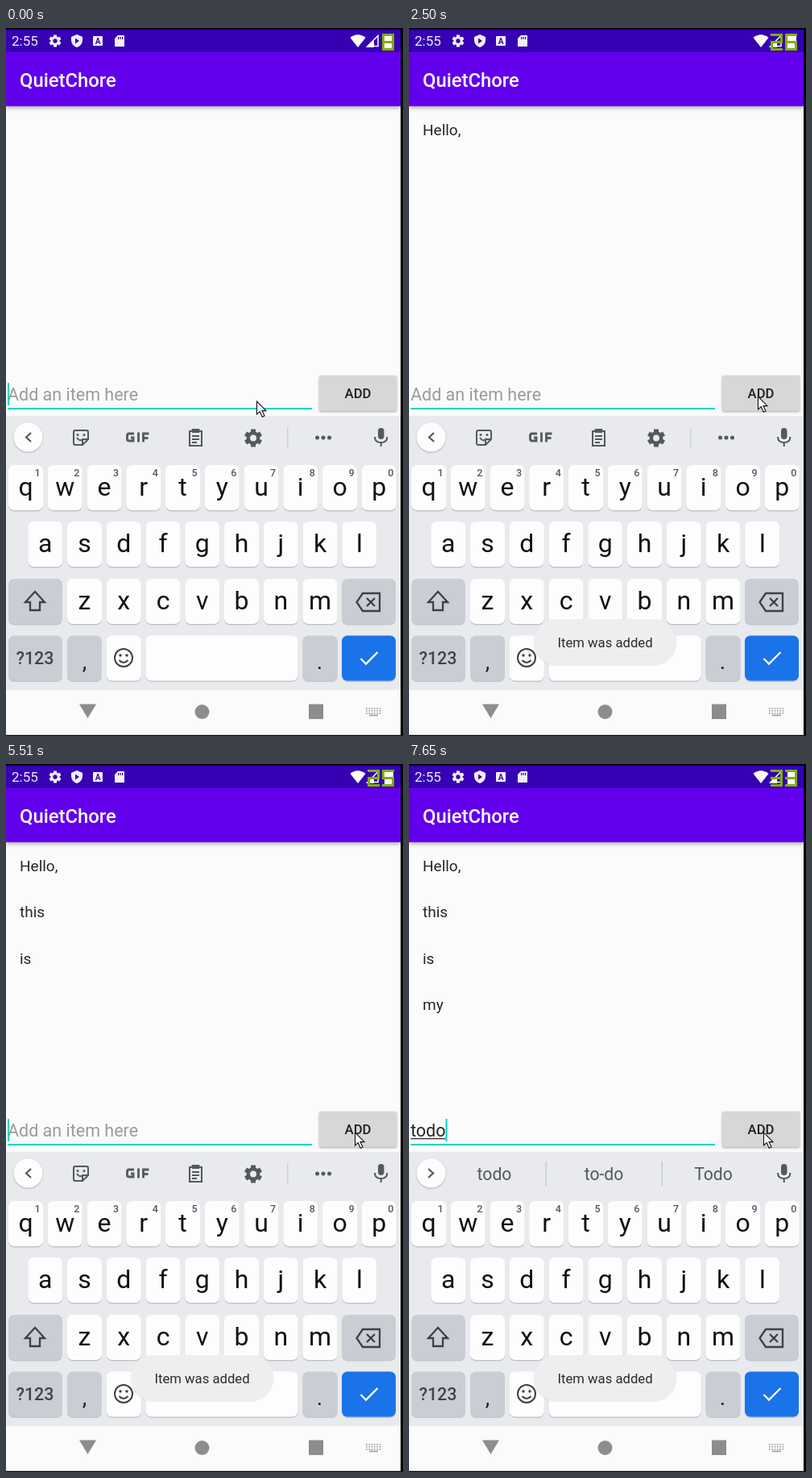
An HTML page with a canvas for the animation above (8000 ms loop, 493x878 px).

```html
<!DOCTYPE html>
<html lang="en">
<head>
<meta charset="utf-8">
<title>To-do list</title>
<style>
html, body { margin: 0; width: 100%; height: 100%; overflow: hidden; background: #000; }
canvas { display: block; width: 493px; height: 878px; }
</style>
</head>
<body>
<canvas id="stage" width="493" height="878"></canvas>
<script>
const ctx = document.getElementById('stage').getContext('2d');
const LOOP = 8000;
const TEAL = '#03d5c0', INK = '#55585d', PAPER = '#fbfbfb', BOARD = '#e8eaed', FUNC = '#cacdd4';

const START = {
  text: '', underline: 0, words: null, caret: true, items: [], fresh: 1,
  press: 0, toast: 0, mouse: [311.5, 463], fps: '8'
};

// Each step changes part of the state from its time on.
const STEPS = [
  [280, { text: 'H', underline: 1 }],
  [410, { text: 'He', underline: 2, words: ['He', 'Hey', 'Hello'] }],
  [540, { text: 'Hel', underline: 3, words: ['Hel', 'Hello', 'Help'], fps: '4' }],
  [670, { text: 'Hello', underline: 4, words: ['Hell', 'Hello', "He'll"] }],
  [940, { underline: 5, words: ['Hello', 'hello', "Hello's"] }],
  [1250, { text: 'Hello,', underline: 0, fps: '16' }],
  [1400, { words: ['I', 'how', 'the'] }],
  [1800, { mouse: [375, 460], fps: '26' }],
  [1950, { mouse: [433.5, 457] }],
  [2080, { press: 1 }],
  [2220, { press: 2, text: '', words: null, items: ['Hello,'], fresh: .5, toast: .5 }],
  [2360, { press: 0, fresh: 1, toast: 1 }],
  [2500, { caret: false }],
  [3050, { caret: true }],
  [3200, { text: 't', underline: 1 }],
  [3350, { text: 'th', underline: 2, words: ['th', 'the', 'that'], fps: '22' }],
  [3500, { text: 'thi', underline: 3, words: ['thi', 'this', 'think'] }],
  [3670, { text: 'this', underline: 4, words: ['this', "this'll", 'thistle'] }],
  [3820, { press: 1 }],
  [3970, { press: 2, text: '', words: null, items: ['Hello,', 'this'], fresh: .5, toast: .5 }],
  [4090, { press: 0, fresh: 1, toast: 0 }],
  [4390, { toast: .5, fps: '24' }],
  [4530, { toast: 1, text: 'i', underline: 1 }],
  [4670, { text: 'is', underline: 1, words: ['I', 'in', 'is'] }],
  [4810, { underline: 2, words: ['is', "isn't", 'island'] }],
  [5240, { press: 1, fps: '25' }],
  [5380, { press: 2, text: '', words: null, items: ['Hello,', 'this', 'is'], fresh: .5 }],
  [5510, { press: 0, fresh: 1 }],
  [5790, { text: 'm', underline: 1 }],
  [5930, { text: 'my', underline: 2, words: ['my', 'myself', 'mine'], toast: .5 }],
  [6060, { toast: 0 }],
  [6420, { mouse: [440.5, 457], toast: .5 }],
  [6560, { press: 1, toast: 1 }],
  [6690, { press: 2, text: '', words: null, items: ['Hello,', 'this', 'is', 'my'], fresh: .5, fps: '39' }],
  [6810, { press: 0, fresh: 1 }],
  [7350, { text: 't', underline: 1 }],
  [7500, { text: 'tod', underline: 3, words: ['tod', 'today', 'todo'] }],
  [7650, { text: 'todo', underline: 4, words: ['todo', 'to-do', 'Todo'], fps: '33' }]
];

const stateAt = t => STEPS.reduce((s, [at, change]) => at <= t ? Object.assign(s, change) : s, { ...START });

function rect(x, y, w, h, color) {
  ctx.fillStyle = color;
  ctx.fillRect(x, y, w, h);
}

function box(x, y, w, h, r, color) {
  ctx.fillStyle = color;
  ctx.beginPath();
  ctx.roundRect(x, y, w, h, r);
  ctx.fill();
}

function disc(x, y, r, color) {
  ctx.fillStyle = color;
  ctx.beginPath();
  ctx.arc(x, y, r, 0, 7);
  ctx.fill();
}

function fill(d, color) {
  ctx.fillStyle = color;
  ctx.fill(new Path2D(d));
}

function line(d, color, width = 2) {
  ctx.strokeStyle = color;
  ctx.lineWidth = width;
  ctx.stroke(new Path2D(d));
}

function label(text, x, y, size, color, align = 'left', weight = 400) {
  ctx.font = `${weight} ${size}px Roboto, sans-serif`;
  ctx.textAlign = align;
  ctx.fillStyle = color;
  ctx.fillText(text, x, y);
}

function shadowed(blur, dy, alpha, draw) {
  ctx.save();
  ctx.shadowColor = `rgba(0,0,0,${alpha})`;
  ctx.shadowBlur = blur;
  ctx.shadowOffsetY = dy;
  draw();
  ctx.restore();
}

function gear(x, y, r, color, hole) {
  ctx.save();
  ctx.translate(x, y);
  for (let i = 0; i < 3; i++) {
    rect(-r * .27, -r, r * .54, r * 2, color);
    ctx.rotate(Math.PI / 3);
  }
  disc(0, 0, r * .76, color);
  disc(0, 0, r * .36, hole);
  ctx.restore();
}

function header() {
  rect(0, 2, 490, 28, '#3700b3');
  shadowed(5, 2, .35, () => rect(0, 30, 490, 67, '#6200ee'));
  rect(0, 2, 490, 28, '#3700b3');
  label('2:55', 7, 22, 17, '#f0ebfa');
  gear(61, 16, 7.5, '#f3effb', '#3700b3');
  fill('M88 8 l7 3 v5 q-1 6 -7 8 q-6 -2 -7 -8 v-5z', '#f3effb');
  fill('M86 12.5 l5 3.5 l-5 3.5z', '#3700b3');
  box(108, 10, 12, 12, 1, '#f3effb');
  label('A', 114, 19.5, 10, '#3700b3', 'center', 700);
  fill('M139 9 h7 q1 0 1 1 v13 h-12 v-10z', '#f3effb');
  for (const x of [139, 141.5, 144]) rect(x, 11, 1.2, 3, '#3700b3');
  fill('M427.5 12 q9.5 -7.5 19 0 l-9.5 12z', '#fff');
  line('M449 22.5 h13 v-13z', '#fff', 1.5);
  fill('M447 24 L457 14 V24z', '#fff');
  fill('M470 10 h3 v-2 h5 v2 h3 v15 h-11z', '#fff');
  label('QuietChore', 17, 73, 23.8, '#fff', 'left', 500);
}

// Seven segments: top, upper right, lower right, bottom, lower left, upper left, middle.
const SEGMENTS = [[0, 0, 15, 3], [12, 0, 3, 11], [12, 9, 3, 12], [0, 18, 15, 3], [0, 9, 3, 12], [0, 0, 3, 11], [0, 9, 15, 3]];
const LIT = { 1: '12', 2: '01346', 3: '01236', 4: '1256', 5: '02356', 6: '023456', 8: '0123456', 9: '012356' };

function counter(digits) {
  [...digits].reverse().forEach((digit, place) => {
    for (const i of LIT[digit]) {
      const [x, y, w, h] = SEGMENTS[i];
      rect(467 - 18 * place + x, 7 + y, w, h, '#80b000');
    }
  });
}

function list({ items, fresh }) {
  items.forEach((item, i) => {
    ctx.globalAlpha = i === items.length - 1 ? fresh : 1;
    label(item, 17, 133 + 57.4 * i, 19, '#272727');
  });
  ctx.globalAlpha = 1;
}

function field({ text, underline, caret }) {
  label(text || 'Add an item here', 2, 462, 21.5, text ? '#272727' : '#9b9b9b');
  const width = text ? ctx.measureText(text).width : 0;
  if (text && underline) rect(2, 464, ctx.measureText(text.slice(0, underline)).width, 1.3, '#333');
  rect(2, 471, 378, 2, TEAL);
  if (caret) rect(2 + width, 440, 2, 28, TEAL);
}

function addButton({ press, mouse }) {
  const color = ['#d6d7d7', '#d0d1d1', '#babbbb'][press];
  shadowed(3, 1, .35, () => box(389, 431, 96, 44, 2, color));
  if (press === 1) {
    ctx.save();
    ctx.beginPath();
    ctx.rect(389, 431, 96, 44);
    ctx.clip();
    disc(mouse[0], 458, 33, '#c5c6c6');
    ctx.restore();
  }
  label('ADD', 437, 459, 16.7, '#202020', 'center', 500);
}

function toolbar() {
  line('M31 502 l-6 5.5 l6 5.5', INK, 2.2);
  line('M86 499 h14 q2 0 2 2 v9 l-7 7 h-9 q-2 0 -2 -2 v-14 q0 -2 2 -2z M102 510 h-5 q-2 0 -2 2 v5 M88 508 q4 6 8 1', INK, 2);
  disc(89, 504.5, 1.5, INK);
  disc(97, 504.5, 1.5, INK);
  line('M159 503 h-6 q-2.5 0 -2.5 2.5 v4 q0 2.5 2.5 2.5 h5 v-4 h-3 M164.5 501.500 v12 M170.500 513.500 v-10.5 h7 M170.500 508.500 h6', INK, 2.8);
  line('M228 500 h15 v18 h-15z M231 506 h9 M231 510 h9 M231 514 h6', INK, 2);
  box(230.5, 497, 10, 5, 1, INK);
  gear(307, 508.5, 11, INK, BOARD);
  rect(349, 495, 1.5, 26, '#d0d3d7');
  for (const x of [386.5, 394, 401.5]) disc(x, 508, 2.5, INK);
}

function suggestions(words) {
  line('M24 502 l6 5.5 l-6 5.5', INK, 2.2);
  rect(169.5, 493, 1.5, 30, '#c8cbcf');
  rect(313.5, 493, 1.5, 30, '#c8cbcf');
  words.forEach((word, i) => label(word, 106 + 136 * i, 516, 21.2, INK, 'center'));
}

function strip(words) {
  shadowed(2, 1, .25, () => disc(27.5, 507.5, 18, '#fdfdfd'));
  if (words) suggestions(words); else toolbar();
  box(462, 496, 7.5, 14, 3.7, INK);
  line('M458 507 q0 7 7.7 7 q7.700 0 7.700 -7 M465.700 514 v5', INK, 2);
}

function key(x, y, w = 43, color = '#fdfdfd') {
  box(x, y + 1.5, w, 56, 7, '#c3c6cb');
  box(x, y, w, 56, 7, color);
}

function letters(row, x0, y, hints) {
  [...row].forEach((letter, i) => {
    const x = x0 + 48.75 * i;
    key(x, y);
    label(letter, x + 21.5, y + 37.5, 32, '#111', 'center');
    if (hints) label((i + 1) % 10, x + 36, y + 14, 12.5, INK, 'center', 500);
  });
}

function keyboard() {
  rect(0, 481, 490, 340, BOARD);
  letters('qwertyuiop', 3, 542, true);
  letters('asdfghjkl', 27.3, 612);
  letters('zxcvbnm', 76, 683);
  key(3, 683, 67, FUNC);
  key(417, 683, 67, FUNC);
  key(3, 753.5, 67, FUNC);
  key(76, 753.5, 43, FUNC);
  key(124.8, 753.5);
  key(173.5, 753.5, 189);
  key(368.5, 753.5, 43, FUNC);
  key(417, 753.5, 67, '#1a73e8');

  line('M36 699 l12 13 h-6 v10 h-12 v-10 h-6z', '#3e4145', 2.3);
  line('M443 701 h21 v22 h-21 l-7.500 -11z M448 707 l10 10 M458 707 l-10 10', '#3e4145', 2.3);
  label('?123', 36, 789, 21.5, '#414449', 'center', 500);
  label(',', 97.5, 795, 28, '#222', 'center');
  label('.', 389.5, 795, 28, '#222', 'center');
  line('M440.500 782 l6.500 6.500 l14.500 -14.500', '#fff', 2.3);
}

function smiley() {
  line('M157 781 a11 11 0 1 1 -22 0 a11 11 0 1 1 22 0 M140.500 784 q5.500 6 11 0', '#3e4145', 2);
  disc(142, 778, 1.7, '#3e4145');
  disc(150, 778, 1.7, '#3e4145');
}

function toast(alpha) {
  if (!alpha) return;
  ctx.globalAlpha = alpha;
  shadowed(2, 1, .06, () => box(155, 733, 177, 57, 28, '#eeeeef'));
  label('Item was added', 243.5, 768, 16.7, '#2b2b2b', 'center');
  ctx.globalAlpha = 1;
}

function navigation() {
  rect(0, 821, 490, 55.5, PAPER);
  fill('M91 838.500 h21 l-10.500 17.500z', '#8d8d8d');
  disc(243.5, 848, 9, '#8d8d8d');
  rect(376, 838.5, 18, 18.5, '#8d8d8d');
  for (let row = 0; row < 3; row++)
    for (let i = 0; i < 6; i++) rect(447 + 3.3 * i, 843 + 3 * row, 1.8, 1.6, '#a2a2a2');
  rect(451, 851.5, 11, 1.8, '#a2a2a2');
}

function pointer([x, y]) {
  const arrow = `M${x} ${y} v16 l3.700 -3.300 l3 6.500 l2.800 -1.300 l-3 -6.300 h5z`;
  fill(arrow, '#fff');
  line(arrow, '#111', 1.1);
}

function draw(t) {
  const state = stateAt(t);
  rect(0, 0, 493, 878, '#000');
  rect(0, 30, 490, 846.5, PAPER);
  header();
  counter(state.fps);
  list(state);
  field(state);
  addButton(state);
  keyboard();
  strip(state.words);
  toast(state.toast);
  smiley();
  navigation();
  rect(490, 0, 3, 878, '#000');
  pointer(state.mouse);
}

const begin = performance.now();
function tick() {
  draw((performance.now() - begin) % LOOP);
  requestAnimationFrame(tick);
}
tick();
</script>
</body>
</html>
```
